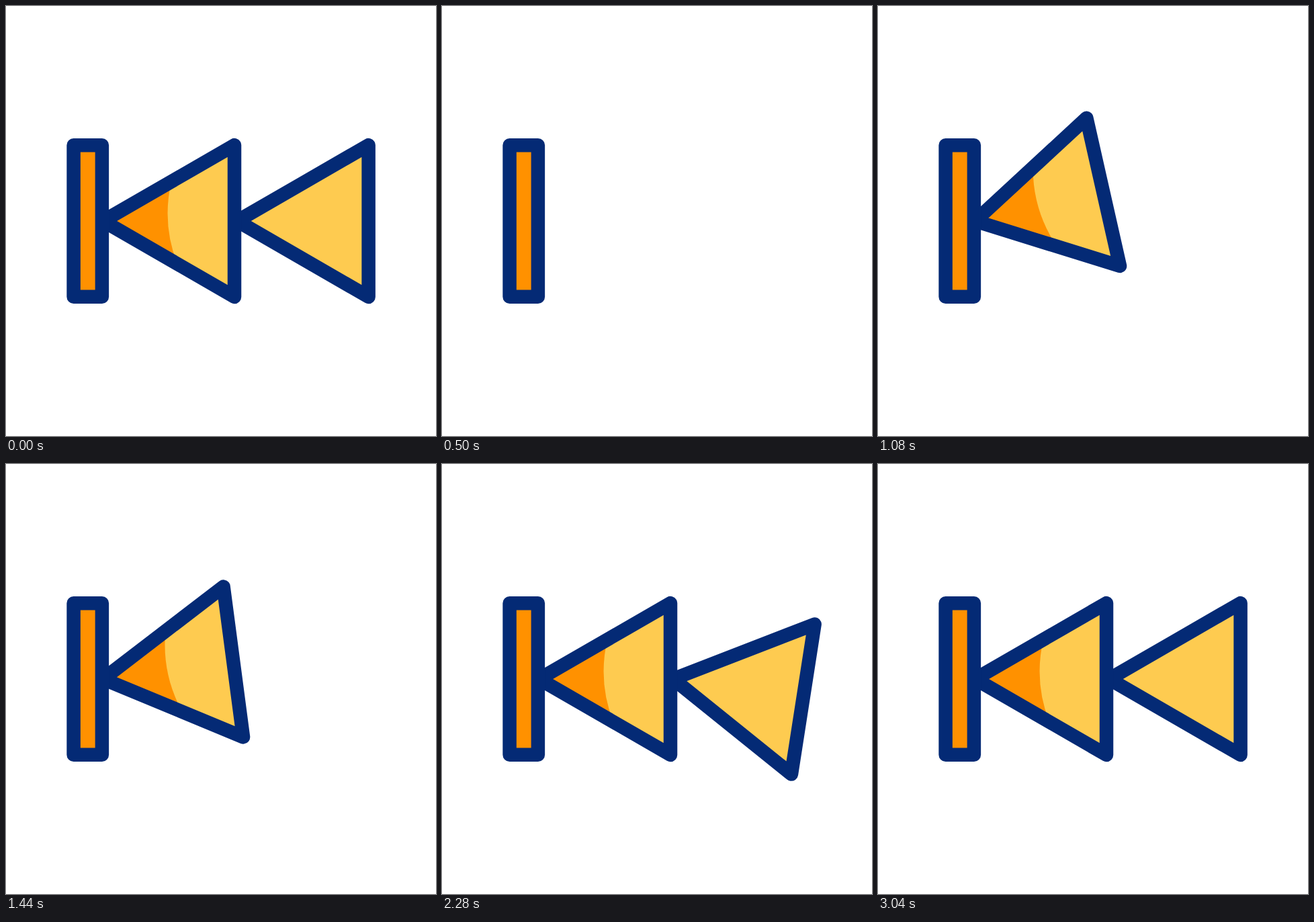
Recreate the animation shown at these times as an HTML page. Size 640x640 px, loop 3600 ms.

```html
<!DOCTYPE html>
<html lang="en">
<head>
<meta charset="utf-8">
<title>Skip back</title>
<style>
  html, body { margin: 0; width: 100%; height: 100%; overflow: hidden; background: #fff; }
  svg { display: block; width: 100%; height: 100%; }
  .line { fill: none; stroke: #042a75; stroke-width: 20.5; stroke-linejoin: round; }
  .light { fill: #fecb50; }
  .dark { fill: #ff9100; }
</style>
</head>
<body>
<svg viewBox="0 0 640 640">
  <defs>
    <path id="triangle" d="M0 0L195.5 -112.9V112.9Z"/>
  </defs>
  <g id="second">
    <use href="#triangle" class="light"/>
    <use href="#triangle" class="line"/>
  </g>
  <g id="first">
    <use href="#triangle" class="dark"/>
    <path class="light" d="M101.5 -58.6A209 209 0 0 0 110.4 63.7L195.5 112.9V-112.9Z"/>
    <use href="#triangle" class="line"/>
  </g>
  <rect class="dark" x="100.6" y="207.3" width="42.3" height="225.4"/>
  <rect class="line" x="100.6" y="207.3" width="42.3" height="225.4"/>
</svg>
<script>
  const LOOP = 3600, STEP = 20, FADE_END = 500;
  const SLIDE_START = 560, SLIDE_END = 940, SLIDE_DISTANCE = 553;

  // Swing around the tip after landing: [ms, degrees]
  const SWING = [[950, 0], [1060, -15.8], [1260, 15], [1460, -10], [1660, 5.9], [1890, -3.8], [1980, 0]];

  const triangles = [
    { node: document.getElementById('first'), tipX: 144.5, delay: 0 },
    { node: document.getElementById('second'), tipX: 344.1, delay: 1060 }
  ];

  const clamp = v => Math.min(1, Math.max(0, v));

  function swingAt(t) {
    const next = SWING.findIndex(key => key[0] > t);
    if (next < 1) return 0;
    const [t0, a0] = SWING[next - 1], [t1, a1] = SWING[next];
    return a0 + (a1 - a0) * (t - t0) / (t1 - t0);
  }

  function place({ node, tipX, delay }, time) {
    let x = tipX, angle = 0, stretch = 0, opacity = 1;
    if (time < FADE_END) {
      opacity = 1 - time / FADE_END;
    } else {
      const t = time - delay;
      const slide = clamp((t - SLIDE_START) / (SLIDE_END - SLIDE_START));
      x += SLIDE_DISTANCE * (1 - slide);
      stretch = Math.sin(Math.PI * slide);
      angle = swingAt(t);
    }
    node.setAttribute('opacity', opacity);
    node.setAttribute('transform',
      `translate(${x} 320) rotate(${angle}) scale(${1 + 0.15 * stretch} ${1 - 0.09 * stretch})`);
  }

  function draw(now) {
    const time = Math.floor((now % LOOP) / STEP) * STEP;
    triangles.forEach(triangle => place(triangle, time));
  }

  const start = performance.now();
  function tick() {
    draw(performance.now() - start);
    requestAnimationFrame(tick);
  }
  tick();
</script>
</body>
</html>
```
